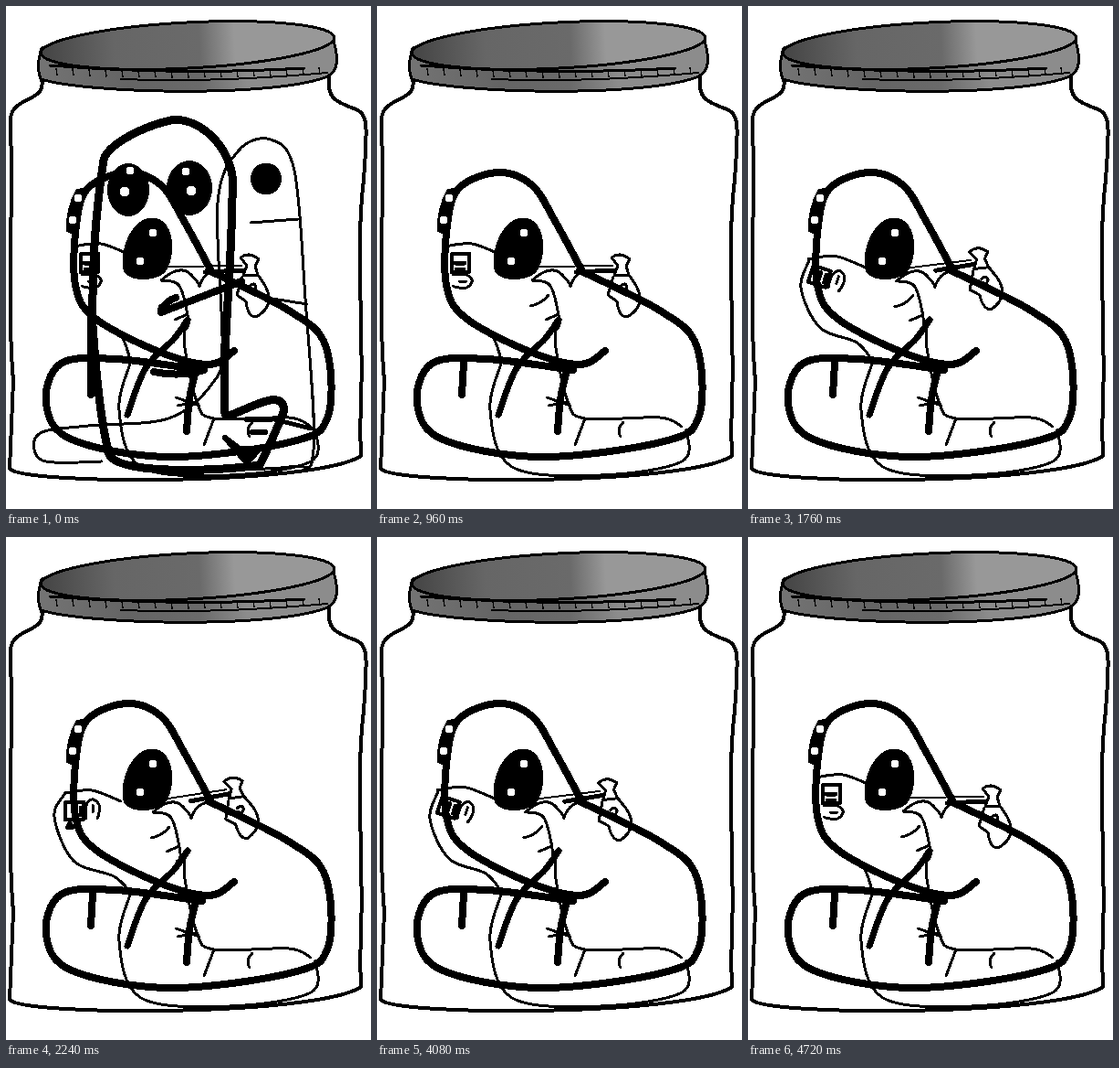
Recreate the animation shown at these times as an HTML page. Size 400 px wide and 550 px high, loop 4.88 s.

```html
<!DOCTYPE html>
<html lang="en">
<head>
<meta charset="utf-8">
<title>Creature in a jar</title>
<style>
html, body { margin: 0; width: 100%; height: 100%; overflow: hidden; background: #fff; }
svg { display: block; width: 400px; height: 550px; }
</style>
</head>
<body>
<svg id="stage" viewBox="0 0 400 550" shape-rendering="crispEdges" stroke-linecap="round" stroke-linejoin="round">
  <defs>
    <linearGradient id="top">
      <stop offset="0" stop-color="#444"/>
      <stop offset=".25" stop-color="#666"/>
      <stop offset=".54" stop-color="#6a6a6a"/>
      <stop offset=".66" stop-color="#989898"/>
    </linearGradient>
    <linearGradient id="rim">
      <stop offset="0" stop-color="#747474"/>
      <stop offset=".3" stop-color="#646464"/>
      <stop offset=".54" stop-color="#6a6a6a"/>
      <stop offset=".7" stop-color="#8c8c8c"/>
    </linearGradient>
  </defs>
</svg>
<script>
const stage = document.getElementById('stage');
const LOOP = 4880, STEP = 160;
const THIN = 3, BOLD = 8;

function add(tag, attrs, parent = stage) {
  const el = document.createElementNS('http://www.w3.org/2000/svg', tag);
  for (const key in attrs) el.setAttribute(key, attrs[key]);
  return parent.appendChild(el);
}

const group = (parent = stage) => add('g', {}, parent);
const points = text => text.split(' ').map(pair => pair.split(',').map(Number));

// Catmull-Rom spline through a few key points
function curve(pts) {
  const at = i => pts[Math.max(0, Math.min(pts.length - 1, i))];
  let d = 'M' + pts[0];
  for (let i = 0; i < pts.length - 1; i++) {
    const [a, b, c, e] = [at(i - 1), at(i), at(i + 1), at(i + 2)];
    const near = b.map((v, k) => v + (c[k] - a[k]) / 6);
    const far = c.map((v, k) => v - (e[k] - b[k]) / 6);
    d += `C${near} ${far} ${c}`;
  }
  return d;
}

const path = (parent, d, width = THIN, fill = 'none') =>
  add('path', { d, fill, stroke: '#000', 'stroke-width': width }, parent);
const ink = (parent, text, width) => path(parent, curve(points(text)), width);
const oval = (parent, cx, cy, rx, ry) => add('ellipse', { cx, cy, rx, ry }, parent);
const glint = (parent, cx, cy, r = 4.5) => add('circle', { cx, cy, r, fill: '#fff' }, parent);

function drawJar() {
  const jar = group();
  path(jar, 'M39 80C45 106 6 98 5 124C8 240 1 330 8 410L4 506C20 524 340 524 389 492L388 460C394 370 382 270 392 190C396 130 398 118 381 112C358 104 352 98 354 78', 4);
  path(jar, 'M39 46C33 66 36 74 38 80C90 96 290 100 350 78C366 72 364 55 359 38Z', 3, 'url(#rim)');
  add('ellipse', {
    cx: 199, cy: 43, rx: 161, ry: 25, transform: 'rotate(-3 199 43)',
    fill: 'url(#top)', stroke: '#000', 'stroke-width': 3
  }, jar);
  path(jar, 'M48 65Q190 76 327 68', THIN);
  path(jar, 'M126 80Q230 84 352 73', 2);
  for (let x = 55; x < 350; x += 18) path(jar, `M${x} ${66 + 5 * Math.sin(x / 120)}l1 7`, 1.5);
}

function drawWorm() {
  const worm = group();
  ink(worm, '225,290 195,235 170,196 133,182 90,199 77,240 76,305 97,341 165,377 222,392 250,377', BOLD);
  ink(worm, '222,289 310,333 350,371 353,448 315,476 180,493 72,474 44,435 60,391 120,386 215,398', BOLD);
  ink(worm, '95,391 93,425', BOLD);
  ink(worm, '199,343 184,364 153,396 133,447', 7);
  ink(worm, '208,398 201,430 198,465', BOLD);
  ink(worm, '137,388 124,442 148,504 245,513 334,498 339,463');
  path(worm, 'M186 428L212 437M188 437L207 433');
  ink(worm, '196,350 196,374 209,432 228,451 310,450 334,460');
  path(worm, 'M228 451L217 480M270 455Q262 463 267 471');

  const open = group(worm);
  path(open, 'M77 201L90 198Q78 222 77 251L66 246Q66 220 77 201Z', 1, '#000');
  path(open, 'M161 232C184 234 186 270 176 288C168 302 132 302 129 288C125 262 140 232 161 232Z', 1, '#000');
  glint(open, 79, 210);
  glint(open, 73, 234);
  glint(open, 161, 248);
  glint(open, 147, 279);
  return { open, shut: ink(worm, '132,268 177,266', 6) };
}

// Arm pieces in the raised pose; moveArm carries them to the lowered one
function drawArm() {
  const arm = group();
  const [hand, brow, chest, tool] = [0, 1, 2, 3].map(() => group(arm));
  path(hand, 'M82 271H101V291H82Z', 4);
  path(hand, 'M86 281h10M87 288h8', 5);
  path(hand, 'M83 294C104 290 110 302 98 308Q88 309 83 306M90 301h8');
  ink(brow, '74,263 104,260 136,272');
  ink(chest, '170,300 190,306 200,345 196,354');
  path(chest, 'M168 328Q180 326 188 316M185 343L199 337');
  path(chest, 'M170 300Q190 282 202 293Q212 303 212 307Q216 292 230 289');
  path(tool, 'M178 285L258 284', 2);
  path(tool, 'M218 291L260 289', 5);
  path(tool, 'M257 275Q267 268 277 277L273 284L276 294H260L264 284Z');
  path(tool, 'M259 296L253 316L263 323Q265 340 274 340Q296 328 284 306L277 295');
  path(tool, 'M267 306q6 -5 7 2q-3 6 -6 2');
  return { hand, brow, chest, tool, forearm: path(arm, '') };
}

function drawCompanions() {
  const others = group();
  ink(others, '105,498 40,497 36,468 90,459 178,451 226,413 237,370 232,215 255,158 290,146 316,180 328,320 337,485 310,504 190,508');
  path(others, 'M268 237L320 233M292 320L330 326');
  const side = { open: oval(others, 285, 189, 17, 17.5), shut: path(others, 'M271 190L299 192', 6) };

  path(others, 'M240 446C236 380 250 260 248 185C240 145 205 118 176 126C145 134 112 152 107 168C96 240 94 300 95 350Q102 450 113 490C122 514 240 508 278 502Q294 470 305 442C302 418 272 438 242 449', 9);
  path(others, 'M93 340V422', BOLD);
  path(others, 'M162 400Q190 406 217 398', BOLD);
  path(others, 'M170 335L258 301M170 332Q176 322 186 319', BOLD);
  path(others, 'M240 472L256 484H278L264 500Z', 6, '#000');
  path(others, 'M264 452H290M270 466H284', 6);
  path(others, 'M290 451L334 462', 5);

  const open = group(others);
  oval(open, 134, 201, 23, 29);
  oval(open, 201, 199, 25, 30);
  glint(open, 136, 180);
  glint(open, 130, 203, 5.5);
  glint(open, 197, 181);
  glint(open, 203, 202, 5.5);
  const shut = path(others, 'M114 202H154M178 200H223', 6);
  return { others, side, head: { open, shut } };
}

drawJar();
const worm = drawWorm();
const arm = drawArm();
const drip = add('path', {});
const { others, side, head } = drawCompanions();

// 'inherit' keeps children hidden together with their group
const show = (el, on) => el.setAttribute('visibility', on ? 'inherit' : 'hidden');

function blink(eyes, closed) {
  show(eyes.open, !closed);
  show(eyes.shut, closed);
}

function armPose(t) {
  const steps = t < 4080 ? Math.floor((t - 1120) / STEP) : 4 - Math.floor((t - 4080) / STEP);
  return Math.max(0, Math.min(5, steps)) / 5;
}

function moveArm(pose) {
  const place = (el, dx, dy, turn = '') =>
    el.setAttribute('transform', `translate(${dx * pose} ${dy * pose}) ${turn}`);
  place(arm.hand, -16, 19, `rotate(${-90 * pose} 91 281)`);
  place(arm.brow, -10, 17);
  place(arm.chest, -9, 1);
  place(arm.tool, -17, -9, `rotate(${-8 * pose} 267 283)`);
  const mix = (x, y, dx, dy) => [x + dx * pose, y + dy * pose];
  arm.forearm.setAttribute('d', curve([
    mix(75, 272, -10, 8), mix(78, 318, -25, -12), mix(98, 342, -24, 12), mix(124, 356, -6, 15), [137, 389]
  ]));
}

function drawDrip(step) {
  const falling = step >= 0 && step < 6;
  show(drip, falling);
  if (!falling) return;
  const x = 70 + step / 2, top = 308 + 6 * step, bottom = Math.min(350, 320 + 8 * step);
  drip.setAttribute('d', `M${x} ${top}C${x + 8} ${bottom} ${x + 5} ${bottom} ${x} ${bottom}S${x - 8} ${bottom} ${x} ${top}Z`);
}

function draw(t) {
  show(others, t < 960);
  blink(head, t >= 160 && t < 320);
  blink(worm, t >= 480 && t < 640);
  blink(side, t >= 640);
  moveArm(armPose(t));
  drawDrip(Math.floor((t - 2240) / STEP));
}

const start = performance.now();
function tick() {
  draw((performance.now() - start) % LOOP);
  requestAnimationFrame(tick);
}
tick();
</script>
</body>
</html>
```
